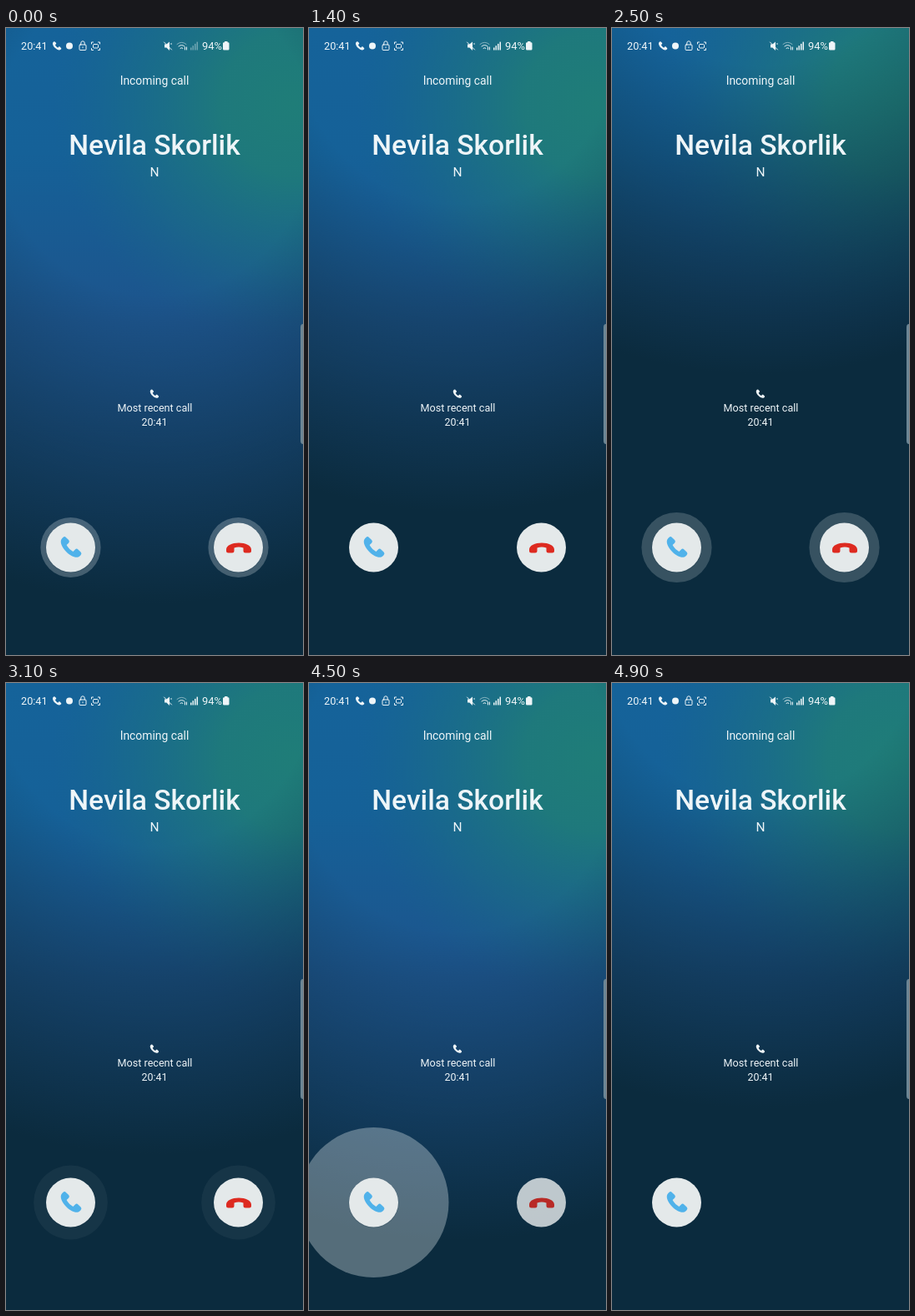
These frames come from a looping animation (356 by 752 pixels, 5000 ms). An HTML page:

```html
<!DOCTYPE html>
<html lang="en">
<head>
<meta charset="utf-8">
<title>Incoming call</title>
<style>
  html, body { margin: 0; width: 100%; height: 100%; overflow: hidden; background: #0b2b3e; }
  svg { display: block; width: 356px; height: 752px; }
  text { font-family: Roboto, "Noto Sans", sans-serif; fill: #eef5f8; }
  .mid { text-anchor: middle; }
  .line { fill: none; stroke: #eef5f8; stroke-linecap: round; stroke-linejoin: round; }
  .solid { fill: #eef5f8; }
</style>
</head>
<body>
<svg viewBox="0 0 356 752">
  <defs>
    <linearGradient id="blue" gradientUnits="userSpaceOnUse" x2="0" y2="752">
      <stop offset="0" stop-color="#15639a"/>
      <stop offset=".2" stop-color="#156198"/>
      <stop offset=".47" stop-color="#1d548c"/>
      <stop offset="1" stop-color="#1c5088"/>
    </linearGradient>
    <radialGradient id="teal" gradientUnits="userSpaceOnUse" cx="345" cy="90" r="290">
      <stop offset="0" stop-color="#1f7d78"/>
      <stop offset=".3" stop-color="#1f7b79" stop-opacity=".92"/>
      <stop offset=".7" stop-color="#1d7280" stop-opacity=".4"/>
      <stop offset="1" stop-color="#1a6688" stop-opacity="0"/>
    </radialGradient>
    <!-- night falls outside a disc that slides up and down -->
    <radialGradient id="night" gradientUnits="userSpaceOnUse" cx="178" cy="165" r="560">
      <stop offset=".34" stop-color="#0b2b3e" stop-opacity="0"/>
      <stop offset="1" stop-color="#0b2b3e"/>
    </radialGradient>
    <path id="handset" d="M-15 2C-15-3-8-6 0-6S15-3 15 2v1.5q0 2.5-2.500 2.500h-4.500q-2.500 0-2.500-2.500v-3.500q-5.500-1.800-11 0v3.500q0 2.500-2.500 2.500h-4.500q-2.500 0-2.500-2.500z"/>
  </defs>

  <rect width="356" height="752" fill="url(#blue)"/>
  <rect width="356" height="752" fill="url(#teal)"/>
  <rect width="356" height="752" fill="url(#night)"/>

  <!-- status bar -->
  <text x="18" y="26" font-size="12.7">20:41</text>
  <use href="#handset" class="solid" transform="translate(60.5 22) rotate(-135) scale(.42)"/>
  <circle cx="76" cy="21.5" r="4" class="solid"/>
  <g class="line">
    <rect x="88" y="20" width="8" height="6.5" rx="1"/>
    <path d="M89.8 20v-2a2.2 2.2 0 0 1 4.4 0v2M92 22.8v1"/>
    <path d="M102.5 19v-2h2M110.5 17h2v2M112.5 24.5v2h-2M104.5 26.5h-2v-2"/>
    <rect x="104.5" y="19.5" width="6" height="4.5" rx="1"/>
  </g>
  <path class="solid" d="M190 19.5h2.3l3.700-3v10.500l-3.700-3.500h-2.300z"/>
  <path class="line" d="M189.5 17l9 9M198 18.5v1"/>
  <g class="line">
    <path d="M205 19.5q5.5-4.5 11 0" opacity=".5"/>
    <path d="M207 22q3.5-3 7 0"/>
    <path d="M209 24.3q1.5-1.200 3 0M214.5 23v3M216.5 23v3"/>
  </g>
  <g id="bars" class="solid"></g>
  <text x="235" y="26" font-size="12.9">94%</text>
  <path class="solid" d="M262 16h3.5v1.2h.7q1.3 0 1.3 1.300v6.700q0 1.300-1.300 1.300h-4.900q-1.300 0-1.300-1.300v-6.700q0-1.300 1.300-1.300h.7z"/>

  <!-- caller -->
  <text class="mid" x="178" y="68" font-size="13.9">Incoming call</text>
  <text class="mid" x="178" y="152" font-size="33.6" font-weight="500">Nevila Skorlik</text>
  <text class="mid" x="178" y="178" font-size="15.5">N</text>
  <use href="#handset" class="solid" transform="translate(177.3 439.3) rotate(-135) scale(.42)"/>
  <text class="mid" x="178.5" y="460" font-size="12.6">Most recent call</text>
  <text class="mid" x="178" y="477" font-size="12.4">20:41</text>
  <path d="M356 355q-3 0-3 4v136q0 4 3 4z" fill="#6b8594"/>

  <!-- buttons -->
  <circle id="ringL" cx="77.5" cy="623" fill="#dfe8ea"/>
  <circle id="ringR" cx="278.5" cy="623" fill="#dfe8ea"/>
  <circle cx="77.5" cy="623.5" r="30" fill="#0b2b3e" opacity=".2"/>
  <circle cx="77.5" cy="623" r="29.5" fill="#e4e9ea"/>
  <use href="#handset" fill="#50b2ea" transform="translate(76.5 624) rotate(-135)"/>
  <g id="decline">
    <circle cx="278.5" cy="623.5" r="30" fill="#0b2b3e" opacity=".2"/>
    <circle cx="278.5" cy="623" r="29.5" fill="#e4e9ea"/>
    <use href="#handset" fill="#dd2a20" transform="translate(279 623.5)"/>
  </g>
</svg>
<script>
const LOOP = 5000, STEP = 100, PULSE = 2000;
const PRESS = 4300, GONE = 4900, SIGNAL = 1300;
const DISC = 560;

// [time, value] steps
const reach = [[0, 690], [400, 715], [800, 725], [1400, 580], [2000, 375], [2300, 365],
  [3100, 565], [3600, 665], [4000, 720], [4400, 695], [4700, 615], [4900, 510]];
const ringSize = [[0, 30], [100, 33], [300, 36.1], [500, 39], [700, 41.2], [900, 43],
  [1100, 43.6], [1400, 44.4]];
const ringFade = [[0, .27], [500, .26], [1100, .15], [1400, .05], [1550, 0]];
const swipeSize = [[4200, 39], [4300, 52], [4700, 128], [4800, 146]];
const declineFade = [[4300, 1], [4700, .65], [4800, .45]];

const $ = id => document.getElementById(id);

function set(node, attrs) {
  for (const key in attrs) node.setAttribute(key, attrs[key]);
}

function at(table, t) {
  const i = table.findIndex(step => step[0] > t);
  if (i === 0) return table[0][1];
  if (i < 0) return table[table.length - 1][1];
  const [t0, a] = table[i - 1], [t1, b] = table[i];
  return a + (b - a) * (t - t0) / (t1 - t0);
}

for (let i = 0; i < 4; i++) {
  const bar = document.createElementNS("http://www.w3.org/2000/svg", "rect");
  const height = 3 + i * 2.3;
  set(bar, { x: 221 + i * 2.5, y: 26.5 - height, width: 1.5, height });
  $("bars").append(bar);
}

function draw(t) {
  set($("night"), { cy: at(reach, t) - DISC });

  const phase = (t + 300) % PULSE;
  const ring = { r: at(ringSize, phase), opacity: at(ringFade, phase) };
  const pressed = t >= PRESS, gone = t >= GONE;
  set($("ringL"), pressed ? { r: at(swipeSize, t), opacity: gone ? 0 : .35 } : ring);
  set($("ringR"), pressed ? { opacity: 0 } : ring);
  set($("decline"), { opacity: gone ? 0 : at(declineFade, t) });
  set($("bars"), { opacity: t >= SIGNAL ? 1 : .4 });
}

const start = performance.now();
function tick() {
  const t = (performance.now() - start) % LOOP;
  draw(Math.floor(t / STEP) * STEP);
  requestAnimationFrame(tick);
}
tick();
</script>
</body>
</html>
```
